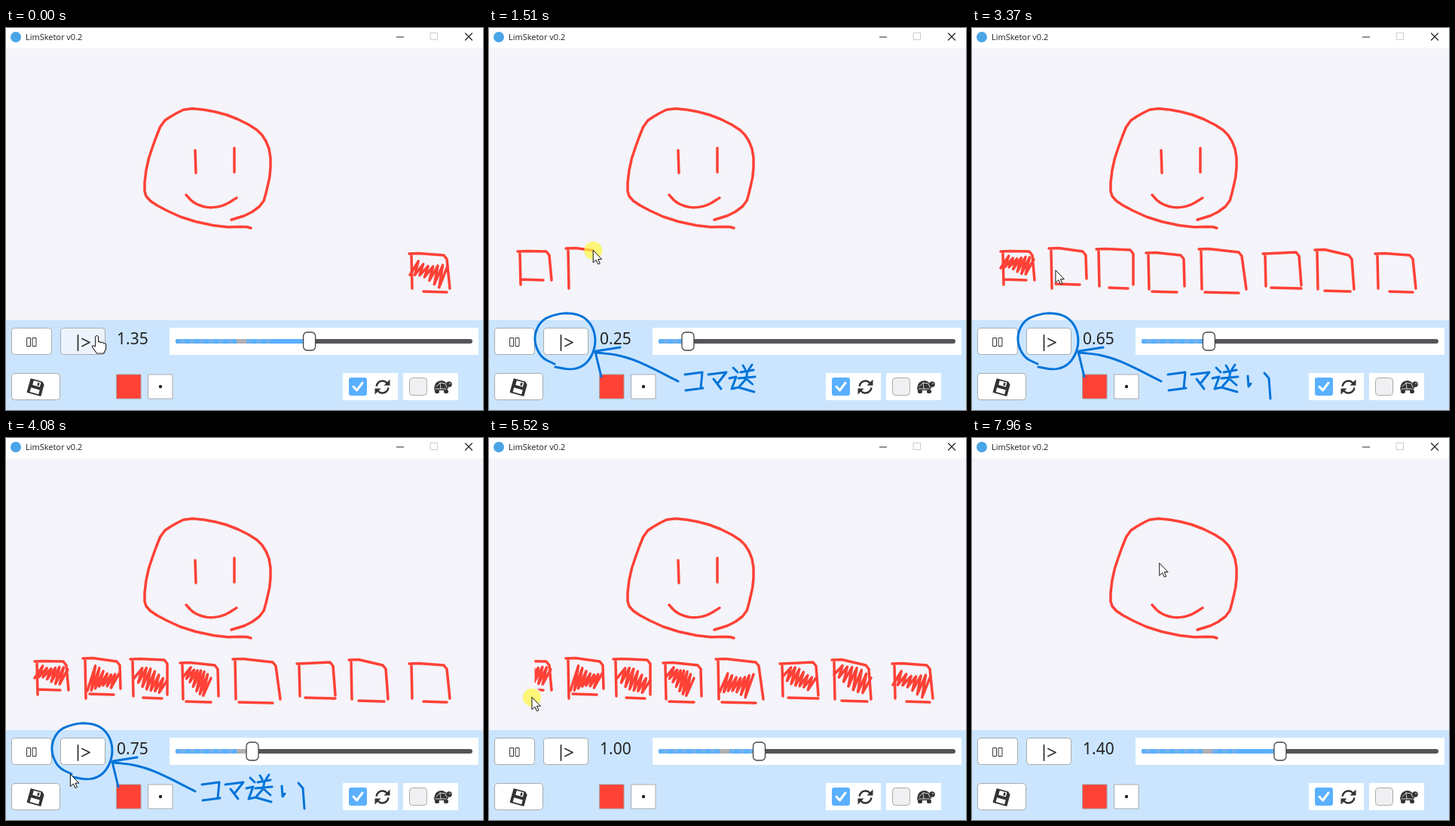
Recreate the animation shown at these times as an HTML page with a canvas. Size 633 px wide and 506 px high, loop 8 s.

```html
<!DOCTYPE html>
<html lang="en">
<head>
<meta charset="utf-8">
<title>Drawing window</title>
<style>
html, body { margin: 0; width: 100%; height: 100%; overflow: hidden; background: #f4f4fa; }
canvas { display: block; width: 633px; height: 506px; }
</style>
</head>
<body>
<canvas id="stage" width="633" height="506"></canvas>
<script>
const ctx = document.getElementById('stage').getContext('2d');
const LOOP = 8000, PAPER = '#f4f4fa', RED = '#ff4136', INK = '#0074d9', BLUE = '#5ab0ff';
const BUTTON = [119, 409];
const MOVE_END = .3, DRAW_END = .75, RETURN_END = .87;

// [step, ms]: when the step button is clicked; one step is 0.05 on the counter
const CLICKS = [[0, 50], [5, 1385], [10, 2560], [15, 3805], [20, 5390], [24, 6410], [28, 7705], [29, 8045]];
const NOTE_START = 300, NOTE_END = 1610, NOTE_GONE = 4600;

// ---- geometry helpers ----
const mix = (a, b, p) => a + (b - a) * p;
const mixPt = (a, b, p) => [mix(a[0], b[0], p), mix(a[1], b[1], p)];
const clamp = v => Math.max(0, Math.min(1, v));
const dist = (a, b) => Math.hypot(b[0] - a[0], b[1] - a[1]);
const pts = text => text.trim().split(/\s+/).map(pair => pair.split(',').map(Number));

function smooth(line, rounds = 2) {
  for (; rounds > 0; rounds--) {
    const out = [line[0]];
    for (let i = 1; i < line.length; i++)
      out.push(mixPt(line[i - 1], line[i], .25), mixPt(line[i - 1], line[i], .75));
    out.push(line[line.length - 1]);
    line = out;
  }
  return line;
}

const lengthOf = line => line.slice(1).reduce((sum, p, i) => sum + dist(line[i], p), 0);

// Part of a group of strokes up to progress p, with the pen position
function trim(strokes, p) {
  let left = p * strokes.reduce((sum, s) => sum + lengthOf(s), 0), tip = strokes[0][0];
  const out = [];
  for (const line of strokes) {
    if (left <= 0) break;
    const part = [line[0]];
    for (let i = 1; i < line.length && left > 0; i++) {
      const d = dist(line[i - 1], line[i]);
      tip = left >= d ? line[i] : mixPt(line[i - 1], line[i], left / d);
      part.push(tip);
      left -= d;
    }
    out.push(part);
  }
  return { strokes: out, tip };
}

// ---- drawings ----
const outline = smooth(pts(`299,254 322,247 341,233 346,215 351,192 351,165 343,145 330,132
  300,117 270,109 240,106 222,115 207,125 197,150 187,180 183,213 187,226 205,238 240,254 287,264 318,263 325,265`), 1);
const eyes = [pts('251,162 252,192'), pts('303,159 303,191')];
const mouth = smooth(pts('239,221 248,231 262,237 275,238 290,235 306,225'));

// left, top, top-right x/y, bottom-right x/y, left edge bottom, base from x, base to x, base y
const boxes = [
  [38, 296, 79, 297, 83, 334, 340, 42, 72, 333],
  [102, 292, 150, 297, 152, 332, 345, 111, 143, 339],
  [165, 293, 213, 295, 214, 340, 342, 182, 207, 344],
  [231, 298, 280, 302, 282, 342, 346, 239, 272, 349],
  [301, 293, 357, 298, 364, 346, 346, 309, 354, 350],
  [386, 299, 433, 298, 437, 341, 342, 397, 437, 344],
  [455, 294, 503, 302, 507, 346, 346, 468, 502, 348],
  [535, 299, 584, 302, 589, 345, 345, 554, 585, 349]
].map(([x, y, tx, ty, rx, ry, ly, bx, ex, by]) => ({
  x, y, right: rx, bottom: by,
  strokes: [
    [[x + 3, y + 3], [x + 4, ly]],
    [[x, y], [x + 13, y - .5], [tx - 3, ty - 1], [tx + 1, ty + 4], [rx, ry]],
    [[bx, by], [ex, by + 1]]
  ]
}));

// from x, to x, then top and bottom at each end
const scribbles = [
  [42, 78, 300, 318, 308, 324], [112, 146, 304, 332, 314, 330],
  [174, 210, 303, 320, 318, 342], [239, 268, 300, 318, 318, 342],
  [310, 347, 314, 334, 316, 342], [394, 430, 304, 316, 316, 338],
  [462, 503, 297, 316, 316, 340], [540, 582, 309, 325, 318, 342]
].map(([x0, x1, top0, low0, top1, low1], n) => {
  const line = [];
  for (let i = 0; i <= 13; i++) {
    const p = i / 13, wobble = Math.sin(i * 2.7 + n * 1.9) * 3, up = i % 2;
    line.push([mix(x0, x1, p) + (up ? 4 : -4), (up ? mix(top0, top1, p) : mix(low0, low1, p)) + wobble]);
  }
  return [line];
});

const erasers = boxes.map(({ x, y, right, bottom }) =>
  [[[x + 9, y], [x + 9, bottom + 11], [right - 9, bottom + 10], [right - 9, y]]]);
erasers[4] = [pts('328,308 322,335 314,320 305,300 304,345 352,345 355,298')];
const eyeEraser = [pts('303,159 303,191 252,192 252,160')];

const note = [
  smooth(pts('87,445 70,437 61,420 61,403 70,387 86,380 104,377 124,381 137,394 142,413 138,432 127,447 110,453 88,449')),
  smooth(pts('251,468 202,443 172,433 143,430')), pts('174,423 142,428'), pts('141,429 149,462'),
  pts('260,459 283,456 281,477'), pts('261,480 284,477'),
  pts('291,459 315,456 304,470'), pts('298,465 308,478'),
  pts('324,450 330,456'), pts('319,464 328,462 322,478 331,476 352,482'),
  pts('337,447 340,452'), pts('349,446 345,452'), pts('334,456 351,453'),
  pts('331,464 353,462'), pts('343,455 341,465 333,474'), pts('342,465 351,473'),
  pts('366,461 367,475 370,471'), pts('388,457 394,464 396,491')
];

// What is drawn or erased in each step
const actions = [[outline], [eyes[0]], [eyes[1]], [mouth],
  ...boxes.map(b => b.strokes), ...scribbles, ...erasers, eyeEraser];

// ---- timing ----
function clickTime(step) {
  const i = Math.max(1, CLICKS.findIndex(([k]) => k >= step));
  const [k0, t0] = CLICKS[i - 1], [k1, t1] = CLICKS[i];
  return mix(t0, t1, (step - k0) / (k1 - k0));
}

function pose(t) {
  if (t < 50) t = clickTime(27) + 6;
  let step = 0;
  while (step < 28 && clickTime(step + 1) <= t) step++;
  const start = clickTime(step), u = clamp((t - start) / (clickTime(step + 1) - start));
  const p = clamp((u - MOVE_END) / (DRAW_END - MOVE_END));
  const strokes = actions[step], tip = trim(strokes, p).tip;
  let at = tip;
  if (u < MOVE_END) {
    const q = (u / MOVE_END) ** 2;
    at = mixPt(BUTTON, strokes[0][0], q);
    at[1] -= 45 * Math.sin(Math.PI * q);
  } else if (u >= DRAW_END) {
    const rest = step === 15 ? [85, 446] : BUTTON;
    at = u < RETURN_END
      ? mixPt(tip, rest, (u - DRAW_END) / (RETURN_END - DRAW_END))
      : mixPt(rest, BUTTON, clamp((u - RETURN_END) / .06));
  }
  return {
    step, p, at,
    pressed: u >= MOVE_END && u < DRAW_END,
    hand: u < .06 || u > .93,
    hover: u < .16 || u > .92
  };
}

// ---- painting ----
function strokeLines(lines, color, width) {
  ctx.strokeStyle = color;
  ctx.lineWidth = width;
  ctx.lineCap = ctx.lineJoin = 'round';
  ctx.beginPath();
  for (const line of lines) line.forEach(([x, y], i) => i ? ctx.lineTo(x, y) : ctx.moveTo(x, y));
  ctx.stroke();
}

function rect(x, y, w, h, fill, border, radius = 0, width = 1) {
  ctx.beginPath();
  ctx.roundRect(x, y, w, h, radius);
  ctx.fillStyle = fill;
  ctx.fill();
  if (border) {
    ctx.strokeStyle = border;
    ctx.lineWidth = width;
    ctx.stroke();
  }
}

function disc(x, y, r, fill) {
  ctx.beginPath();
  ctx.arc(x, y, r, 0, 7);
  ctx.fillStyle = fill;
  ctx.fill();
}

function label(text, x, y, font) {
  ctx.font = font;
  ctx.fillStyle = '#222';
  ctx.fillText(text, x, y);
}

function shape(d, x, y, fill, border, width = 1, angle = 0) {
  const path = new Path2D(d);
  ctx.save();
  ctx.translate(x, y);
  ctx.rotate(angle);
  ctx.fillStyle = fill;
  ctx.fill(path);
  if (border) {
    ctx.strokeStyle = border;
    ctx.lineWidth = width;
    ctx.stroke(path);
  }
  ctx.restore();
}

function paintTitleBar() {
  rect(0, 0, 633, 27, '#fff');
  disc(13, 12, 7, '#4aa5e8');
  label('LimSketor v0.2', 26, 16, '11px "Open Sans", sans-serif');
  rect(518, 11.5, 10, 1, '#222');
  rect(563.5, 6.5, 9, 9, '#fff', '#ccc');
  strokeLines([pts('609.5,7 618.5,16'), pts('618.5,7 609.5,16')], '#222', 1.2);
}

function paintSlider(step) {
  const x = 232.5 + step * 6.3;
  rect(217, 397, 410, 36, '#fff');
  rect(225, 412, 394, 6, '#555459', null, 3);
  rect(225, 412, x - 225, 6, BLUE, null, 3);
  for (let i = 1; i < Math.min(step, 20); i++)
    if (i % 2) rect(225 + i * 6.3, 412, 6.3, 6, '#72b2ee');
  if (step > 13) rect(306, 412, 13, 6, '#b0b0b2');
  rect(x - 8, 403, 16, 24, '#fff', '#444', 5, 1.3);
}

function paintTurtle() {
  disc(588, 472, 3.8, '#333');
  shape('M-10,3 Q-9,-8 0,-8 Q7,-8 9,2 L6,5 L-9,5Z', 578, 475, '#333');
  for (const x of [569, 581]) rect(x, 479, 6, 5, '#333', null, 2);
  strokeLines([pts('571,475 576,470 583,471 585,476'), pts('576,470 577,478'), pts('570,478 584,478')], '#fff', .8);
  disc(589, 471, .8, '#fff');
}

function paintPanel(step, hover) {
  rect(0, 387, 633, 119, '#cbe5ff');
  rect(7.5, 397.5, 53, 35, '#fff', '#aaa', 4);
  for (const x of [28, 35.5]) rect(x, 410.5, 4.5, 11, '#fff', '#333', 0, 1);
  rect(72.5, 397.5, 59, 35, hover ? '#edf4fd' : '#fff', '#aaa', 4);
  strokeLines([pts('95.5,407 95.5,427'), pts('101,411.5 111,416.5 101,421.5')], '#333', 1.8);
  label((step * .05).toFixed(2), 147, 419, '21px "Noto Sans", sans-serif');
  paintSlider(step);

  rect(7.5, 457.5, 64, 35, '#fff', '#aaa', 4);
  shape('M-9,-9 H6 L9,-6 V9 H-9Z', 39.5, 476, '#333', '#333', 1.5, .27);
  shape('M-5,-8 H5 V-2 H-5Z M-6,2 H6 V8 H-6Z', 39.5, 476, '#fff', null, 1, .27);
  shape('M1,-7 H3.5 V-3 H1Z', 39.5, 476, '#333', null, 1, .27);
  rect(147, 459, 32, 32, RED, '#a99');
  rect(189, 459, 32, 32, '#fff', '#aaa');
  disc(205, 475, 2.2, '#222');

  rect(447, 457, 73, 36, '#fff');
  rect(455, 463, 24, 24, BLUE, null, 3);
  strokeLines([pts('461,475 465.5,480 473,470')], '#fff', 3);
  ctx.strokeStyle = '#333';
  ctx.lineWidth = 2.5;
  ctx.lineCap = 'butt';
  for (const turn of [0, Math.PI]) {
    ctx.beginPath();
    ctx.arc(499.5, 475.5, 8, turn + 3.25, turn + 5.6);
    ctx.stroke();
    shape('M10,-10 V-2 H2Z', 499.5, 475.5, '#333', null, 1, turn);
  }

  rect(527, 457, 73, 36, '#fff');
  rect(535.5, 463.5, 23, 23, '#f0f0f2', '#aaa', 4);
  paintTurtle();
}

function paintDrawing(step, p) {
  const done = k => step > k ? 1 : step === k ? p : 0;
  const ink = k => {
    if (done(k) > 0) strokeLines(trim(actions[k], done(k)).strokes, RED, 3.5);
  };
  const wipe = k => {
    if (done(k) > 0) strokeLines(trim(actions[k], done(k)).strokes, PAPER, 27);
  };
  ink(0);
  if (done(28) < 1) { ink(1); ink(2); wipe(28); }
  ink(3);
  for (let i = 0; i < 8; i++) {
    if (done(20 + i) === 1) continue;
    ink(4 + i);
    ink(12 + i);
    wipe(20 + i);
  }
}

function paintCursor({ at: [x, y], hand, pressed }) {
  if (pressed) disc(x, y, 12, 'rgba(255, 246, 70, .72)');
  if (hand)
    shape('M-2,1 Q0,-2 2,1 V8 Q4,6 5,9 Q8,7 9,10 Q12,9 12,12 V17 L9,23 H0 L-6,15 Q-7,11 -2,14Z', x, y, '#fff', '#222', 1.1);
  else
    shape('M0,0 V16 L4,12.5 L6.5,18 L9,17 L6.5,11.5 H11Z', x, y, '#fff', '#111', 1);
}

function paint(t) {
  const now = pose(t);
  rect(0, 0, 633, 506, PAPER);
  paintDrawing(now.step, now.p);
  paintTitleBar();
  paintPanel(now.step, now.hover);
  if (t > NOTE_START && t < NOTE_GONE)
    strokeLines(trim(note, clamp((t - NOTE_START) / (NOTE_END - NOTE_START))).strokes, INK, 3);
  paintCursor(now);
}

const began = performance.now();
function tick() {
  paint((performance.now() - began) % LOOP);
  requestAnimationFrame(tick);
}
tick();
</script>
</body>
</html>
```
